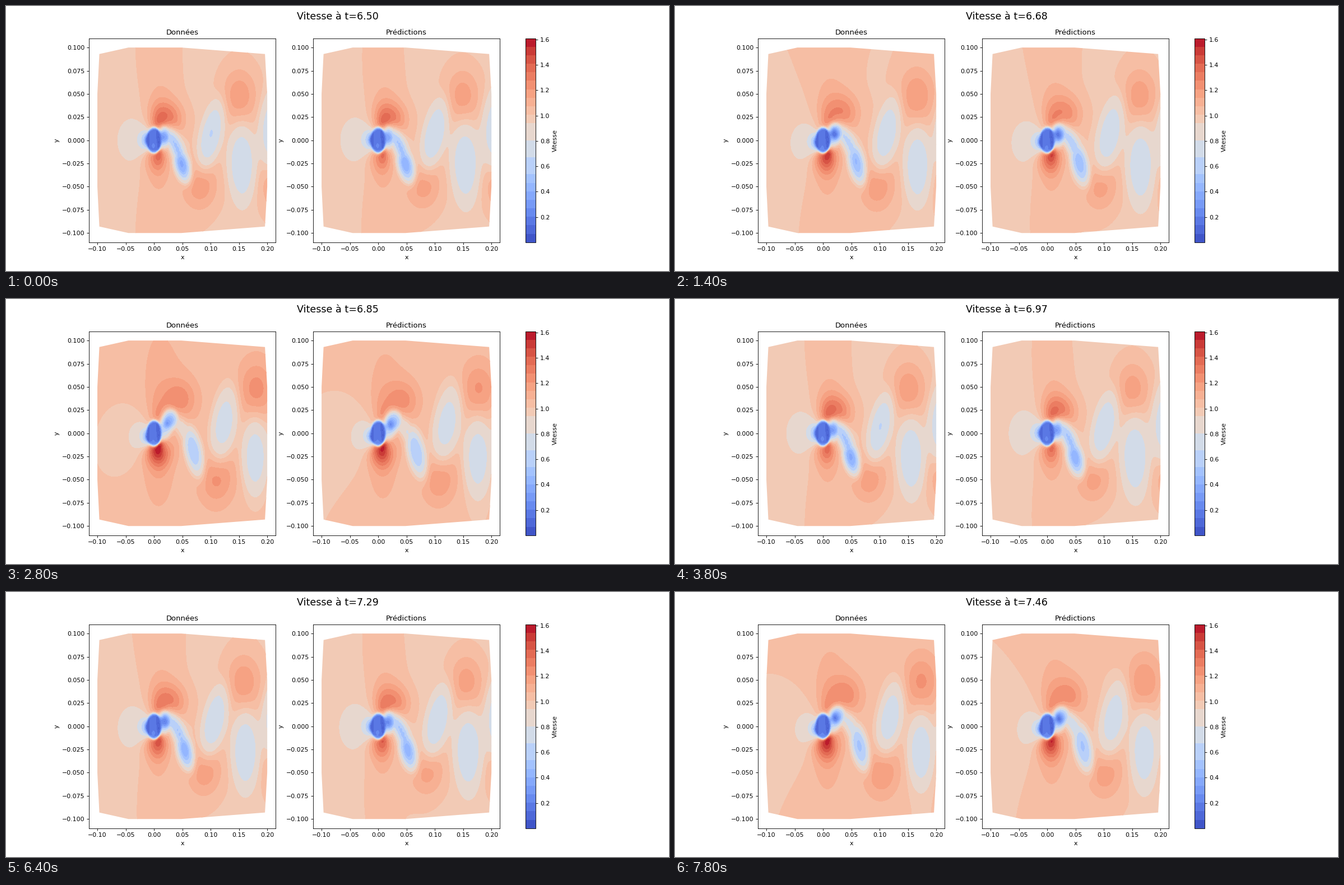
These frames come from a looping animation (1183 by 473 pixels, 8 s). A matplotlib script:

```python
import matplotlib.pyplot as plt
import numpy as np
from matplotlib.animation import FuncAnimation
from matplotlib.cm import ScalarMappable
from matplotlib.colors import BoundaryNorm, ListedColormap
from matplotlib.patches import Polygon

W, H, DPI = 1183, 473, 79
FRAMES, INTERVAL = 40, 200
T0, DT, PERIOD = 6.503, 0.0246, 0.1557
VMAX, BANDS = 1.61, 24
RADIUS = 14.0
DROP = 0.8 / H  # whole layout sits slightly low

plt.rcParams["font.family"] = "DejaVu Sans"

# Field coordinates are in mm, with the obstacle at the origin
xs, ys = np.linspace(-100, 200, 220), np.linspace(-100, 100, 220)
X, Y = np.meshgrid(xs, ys)
R = np.hypot(X, Y)
BODY = 1 / (1 + np.exp(np.clip((R - RADIUS) / 0.8, -50, 50)))


def smooth(t):
    t = np.clip(t, 0, 1)
    return t * t * (3 - 2 * t)


def peak(t, center, width):
    return np.exp(-((t - center) / width) ** 2)


def drift(age, start, rate, release):
    """Stay near the body, then move off at a steady rate."""
    ease = 0.2
    return start + rate * ease * np.log1p(np.exp((age - release) / ease))


def bump(x, y, sx, sy, tilt=0.0, power=1.0):
    dy = Y - y
    dx = X - x - tilt * dy
    return np.exp(-(0.5 * ((dx / sx) ** 2 + (dy / sy) ** 2)) ** power)


def slow_center(age):
    return (drift(age, 14, 110, -0.284),
            -16 - 11 * np.cos(2 * np.pi * age / 1.1))


def slow_patch(age, side, spread):
    x, y = slow_center(age)
    depth = (0.3 + 0.4 * peak(age, -0.15, 0.4)) * smooth((age + 0.75) / 0.4)
    sx = spread * (10 + 7 * smooth(age / 0.9))
    sy = spread * (7 + 22 * smooth((age + 0.4) / 1.2))
    tilt = -0.33 * side * smooth((age + 0.3) / 0.3) * smooth((1.1 - age) / 0.6)
    return depth * bump(x, side * y, sx, sy, tilt, power=1.5)


def fast_patch(age, side):
    x = drift(age, 0, 142, -0.06)
    y = side * (17 + 31 * smooth((age + 0.2) / 0.7))
    amp = (0.21 + 0.21 * peak(age, -0.22, 0.28)) * smooth((age + 0.75) / 0.4)
    sx, sy = 16 + 6 * smooth(age + 0.5), 12 + 8 * smooth(age + 0.2)
    return amp * (0.85 * bump(x, y, sx, sy)
                  + 0.15 * bump(x, y, 1.3 * sx, 2.1 * sy))


def ridge(age, side):
    """Curved slow layer joining a shed patch to the next one."""
    depth = 0.55 * peak(age, 0, 0.22)
    out = np.zeros_like(X)
    if depth < 0.01:
        return out
    hx, hy = slow_center(age)
    tx, ty = slow_center(age - 0.5)
    ty = -ty
    cx, cy = (hx + tx) / 2 + 2, 0.9 * ty
    for s in np.linspace(0.1, 0.9, 8):
        a, b, c = (1 - s) ** 2, 2 * s * (1 - s), s * s
        px, py = a * tx + b * cx + c * hx, a * ty + b * cy + c * hy
        out = np.maximum(out, depth * bump(px, side * py, 7.5, 7.5))
    return out


def inner_speed(phase):
    """Slow, faceted flow inside the obstacle outline."""
    lean = 4 * np.sin(2 * np.pi * phase)
    lens = np.clip(1 - np.abs(X - 8 + 0.15 * Y) / 5, 0, 1)
    edge = np.clip(1 - np.abs(X + 10) / 4, 0, 1)
    facet = np.clip(1 - (np.abs(X + 1) + np.abs(Y + 6 + lean)) / 9, 0, 1)
    return 0.16 - 0.11 * lens - 0.08 * edge + 0.06 * facet


def speed(phase, gain=1.0, spread=1.0, offset=0.0):
    phase %= 1
    wave = 2 * np.pi * phase
    u = 1.005 + offset - 0.025 * np.cos(2 * wave - 0.3)
    u = u + 0.008 * np.sin(wave) * Y / 100

    # Stagnation upstream, acceleration along both sides
    yf = Y + 4 * np.sin(wave)
    rf = np.maximum(np.hypot(X, yf), 10)
    u -= 0.175 * (32 / rf) ** 2 * np.clip(-X / rf, 0, 1) ** 4
    rs = np.maximum(np.hypot(X - 8, Y), 12)
    u += 0.2 * (18 / rs) ** 0.9 * (np.abs(Y) / rs) ** 6

    # Both rows of the street: mirrored copies half a period apart
    slow = 0.5 * bump(14, 4 * np.cos(wave - 0.6), 11, 9, power=1.5)
    link = np.zeros_like(X)
    for k in range(-4, 5):
        age = phase + k / 2
        if -0.75 < age < 2:
            side = -1 if k % 2 else 1
            u += gain * fast_patch(age, side)
            slow += gain * slow_patch(age, side, spread)
            link = np.maximum(link, ridge(age, side))
    u -= np.maximum(np.minimum(slow, 0.95), link)

    u = u * (1 - BODY) + inner_speed(phase) * BODY
    return np.clip(u, 0.02, VMAX - 0.01)


# Pale neighbouring bands share one shade
shade = np.arange(BANDS) + 0.5
for i in (8, 10, 12):
    shade[i:i + 2] = i + 1
colors = plt.get_cmap("coolwarm")(shade / BANDS)
levels = np.linspace(0, VMAX, BANDS + 1)

# The tiny margin keeps the pixel size from rounding down
fig, axes = plt.subplots(1, 2, dpi=DPI,
                         figsize=((W + 1e-6) / DPI, (H + 1e-6) / DPI))
fig.subplots_adjust(top=0.88 - DROP, bottom=0.11 - DROP)
title = fig.suptitle("", fontsize=16, y=0.98 - DROP)

quarter = [(-0.1, 0.05), (-0.0965, 0.093), (-0.045, 0.1),
           (0.048, 0.1), (0.196, 0.093), (0.2, 0.05)]
outline = quarter + [(x, -y) for x, y in reversed(quarter)]
clips = []
for ax, name in zip(axes, ("Données", "Prédictions")):
    ax.set(title=name, xlabel="x", ylabel="y",
           xlim=(-0.115, 0.215), ylim=(-0.11, 0.11))
    ax.set_xticks(np.linspace(-0.1, 0.2, 7))
    ax.set_yticks(np.linspace(-0.1, 0.1, 9))
    ax.set_autoscale_on(False)
    clips.append(ax.add_patch(Polygon(outline, fc="none", ec="none")))

scale = ScalarMappable(BoundaryNorm(levels, BANDS), ListedColormap(colors))
bar = fig.colorbar(scale, ax=list(axes), label="Vitesse", format="%.1f",
                   ticks=np.arange(1, 9) * 0.2, spacing="proportional")
bar.minorticks_off()

drawn = []


def draw(n):
    while drawn:
        drawn.pop().remove()
    phase = n * DT / PERIOD
    fields = (speed(phase),
              speed(phase - 0.012 + 0.012 * np.sin(1.7 * n),
                    gain=0.95, spread=1.05, offset=-0.004))
    for ax, clip, field in zip(axes, clips, fields):
        cs = ax.contourf(xs / 1000, ys / 1000, field,
                         levels=levels, colors=colors)
        cs.set_clip_path(clip)
        drawn.append(cs)
    title.set_text(f"Vitesse à t={T0 + n * DT:.2f}")
    return [*drawn, title]


anim = FuncAnimation(fig, draw, frames=FRAMES, interval=INTERVAL,
                     repeat=True, repeat_delay=0, blit=False)
plt.show()
```
